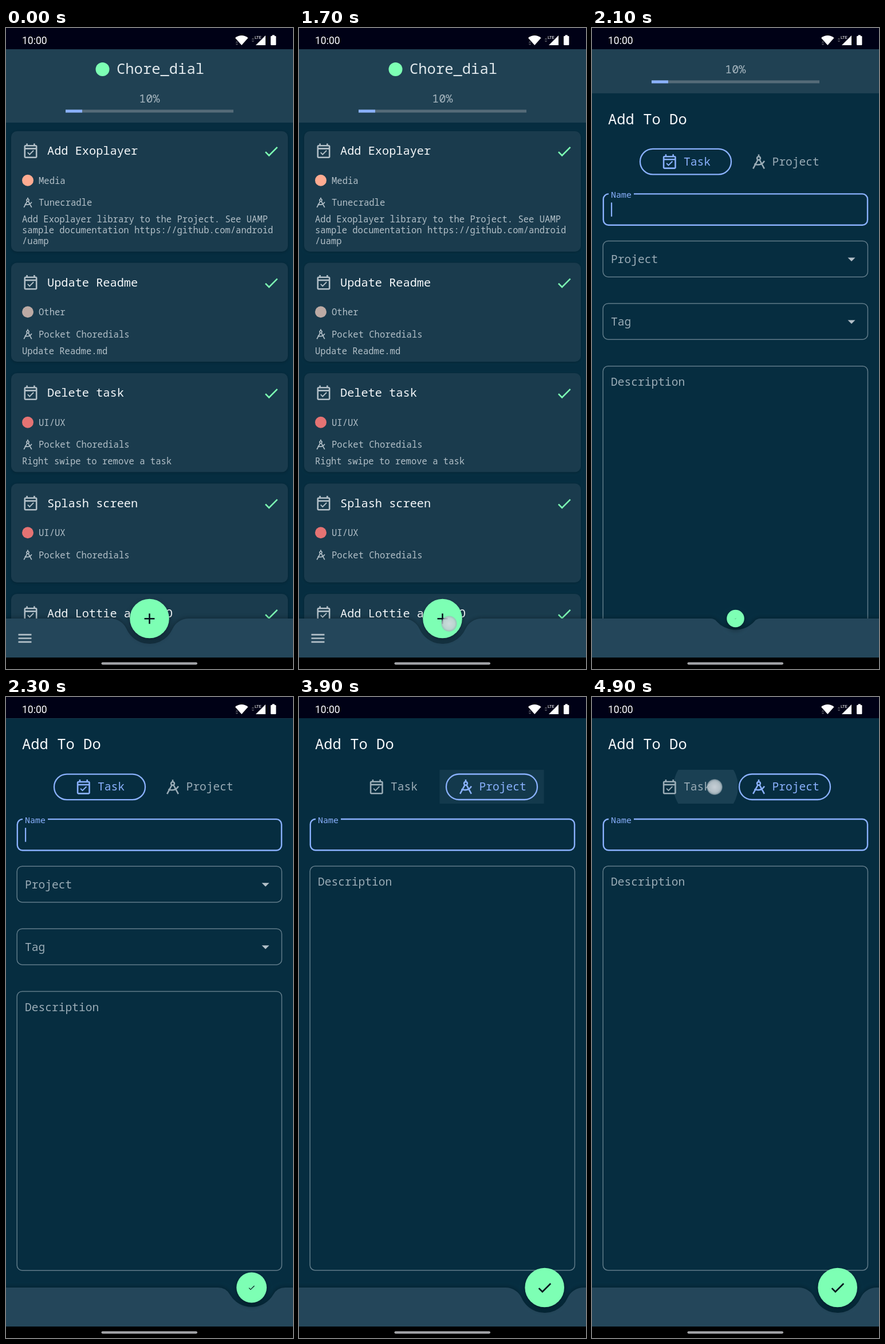
These frames come from a looping animation (501x1118 px, 5 s). An HTML page with a canvas:

```html
<!DOCTYPE html>
<html lang="en">
<head>
<meta charset="utf-8">
<title>To-do app</title>
<style>
html, body { margin: 0; width: 100%; height: 100%; overflow: hidden; background: #000; }
canvas { display: block; }
</style>
</head>
<body>
<canvas id="stage" width="501" height="1118"></canvas>
<script>
const ctx = document.getElementById('stage').getContext('2d');
const LOOP = 5000, W = 501, DP = 1.276, BAR_Y = 1030;
const MONO = '"Noto Sans Mono", "DejaVu Sans Mono", monospace';
const BG = '#062d40', HEADER = '#204153', CARD = '#1a3b4d', BAR = '#24465a', STATUS = '#000116';
const GREEN = '#7dffb4', BLUE = '#8ab1fd', WHITE = '#f5f8fa', SOFT = '#b3c0c8', HINT = '#9aacb6', LINE = '#607b89';

// Icons on a 24-unit grid
const EVENT = new Path2D('M16.53 11.06 15.47 10l-4.88 4.88-2.12-2.12-1.06 1.06L10.59 17zM19 3h-1V1h-2v2H8V1H6v2H5C3.9 3 3 3.9 3 5v14c0 1.1.9 2 2 2h14c1.1 0 2-.9 2-2V5c0-1.1-.9-2-2-2zm0 16H5V9h14zM5 7V5h14v2z');
const CHECK = new Path2D('M9 16.17 4.83 12l-1.42 1.41L9 19 21 7l-1.41-1.41z');
const PLUS = new Path2D('M19 13h-6v6h-2v-6H5v-2h6V5h2v6h6z');
const MENU = new Path2D('M3 18h18v-2H3zm0-5h18v-2H3zm0-7v2h18V6z');
const COMPASS = new Path2D('M12 2v3M14.3 7.3a2.3 2.3 0 1 1-4.6 0a2.3 2.3 0 1 1 4.6 0M10.8 9.5 4.3 21.5M13.2 9.5 19.7 21.5M6 15.2Q15.5 18.5 19.8 11');

const CARDS = [
  [180, 210, 'Add Exoplayer', 'Media', '#ffab91', 'Tunecradle',
    ['Add Exoplayer library to the Project. See UAMP', 'sample documentation https://github.com/android', '/uamp']],
  [409.5, 172.5, 'Update Readme', 'Other', '#bcaaa4', 'Pocket Choredials', ['Update Readme.md']],
  [602, 172.5, 'Delete task', 'UI/UX', '#e57373', 'Pocket Choredials', ['Right swipe to remove a task']],
  [794.5, 172.5, 'Splash screen', 'UI/UX', '#e57373', 'Pocket Choredials', []],
  [987, 172.5, 'Add Lottie at TODO', 'UI/UX', '#e57373', 'Pocket Choredials', []]
];

const ramp = (t, a, b) => Math.min(1, Math.max(0, (t - a) / (b - a)));
const easeOut = p => 1 - (1 - p) ** 2;

function text(s, x, y, size, color, font = MONO) {
  ctx.font = `${size}px ${font}`;
  ctx.fillStyle = color;
  ctx.fillText(s, x, y);
}
function rect(x, y, w, h, color) {
  ctx.fillStyle = color;
  ctx.fillRect(x, y, w, h);
}
function round(x, y, w, h, r) {
  ctx.beginPath();
  ctx.roundRect(x, y, w, h, r);
}
function disc(x, y, r, color) {
  ctx.beginPath();
  ctx.arc(x, y, r, 0, 7);
  ctx.fillStyle = color;
  ctx.fill();
}
function outline(color, width) {
  ctx.strokeStyle = color;
  ctx.lineWidth = width;
  ctx.stroke();
}
function poly(points, color) {
  ctx.beginPath();
  points.forEach(p => ctx.lineTo(...p));
  ctx.fillStyle = color;
  ctx.fill();
}
function icon(path, x, y, color, scale = DP) {
  ctx.save();
  ctx.translate(x, y);
  ctx.scale(scale, scale);
  ctx.translate(-12, -12);
  ctx.fillStyle = ctx.strokeStyle = color;
  ctx.lineWidth = 2;
  if (path === COMPASS) ctx.stroke(path);
  else ctx.fill(path, path === EVENT ? 'evenodd' : 'nonzero');
  ctx.restore();
}
function shadow(blur, dy, alpha) {
  ctx.shadowColor = `rgba(0,10,16,${alpha})`;
  ctx.shadowBlur = blur;
  ctx.shadowOffsetY = dy;
}

function drawCard([y, h, title, tag, color, project, lines]) {
  ctx.save();
  shadow(4, 1, 0.25);
  round(9, y, 483, h, 10);
  ctx.fillStyle = CARD;
  ctx.fill();
  ctx.restore();
  icon(EVENT, 43, y + 35.5, SOFT);
  text(title, 72, y + 41, 20.3, WHITE);
  icon(CHECK, 463, y + 35.2, GREEN);
  disc(38, y + 85.7, 10, color);
  text(tag, 57, y + 91.5, 15.55, SOFT);
  icon(COMPASS, 38, y + 124.5, SOFT, 0.88);
  text(project, 57, y + 130.3, 15.55, SOFT);
  lines.forEach((s, i) => text(s, 28, y + 159.3 + i * 18.6, 15.55, SOFT));
}

function drawHeader() {
  rect(0, 37, W, 128, HEADER);
  disc(168.5, 72, 12, GREEN);
  text('Chore_dial', 193, 80.3, 25.5, '#e0e8ec');
  text('10%', 232, 130.3, 20.3, '#a5b5be');
  rect(104, 142.5, 293, 5, '#556b78');
  rect(104, 142.5, 29, 5, BLUE);
}

function drawChip(x, path, label, selected) {
  const color = selected ? BLUE : HINT;
  if (selected) {
    round(x, 134.5, 159, 44.5, 22.2);
    outline(BLUE, 2.3);
  }
  icon(path, label === 'Task' ? 135.3 : 291, path === EVENT ? 158 : 156.8, color);
  text(label, label === 'Task' ? 160 : 314.5, 163.3, 19.6, color);
}

function drawRipple(fromX, toX, p, alpha) {
  if (p <= 0 || alpha <= 0) return;
  ctx.save();
  ctx.beginPath();
  ctx.rect(toX - 91, 127, 182, 59);
  ctx.clip();
  disc(fromX + (toX - fromX) * p, 156.5, 24 + 107 * p, `rgba(160,190,205,${0.13 * alpha})`);
  ctx.restore();
}

function drawField(label, y, h, arrow) {
  round(19.2, y, 462.2, h, 9);
  outline(LINE, 1.5);
  text(label, 33, y + (arrow ? 38.6 : 34.4), 19.6, HINT);
  if (arrow) poly([[446.5, y + 29], [459.5, y + 29], [453, y + 35.5]], SOFT);
}

function drawForm(t) {
  const project = t >= 3780;
  text('Add To Do', 28, 91.3, 25.5, WHITE);
  drawRipple(355, 336.5, ramp(t, 3550, 3800), 1 - ramp(t, 3780, 4100));
  drawRipple(214, 163.5, ramp(t, 4800, 5133), 1);
  drawChip(84, EVENT, 'Task', !project);
  drawChip(257, COMPASS, 'Project', project);

  round(19.8, 213, 461.2, 54.3, 9);
  outline(BLUE, 2.4);
  rect(29, 210, 44, 6, BG);
  text('Name', 33, 219.5, 15, BLUE);
  if (Math.floor((t - 2000) / 500) % 2 === 0) rect(33, 228, 2.2, 24.5, BLUE);

  if (!project) {
    drawField('Project', 295, 62.8, true);
    drawField('Tag', 404, 62.8, true);
  }
  const top = project ? 295 : 513.3;
  drawField('Description', top, 1000 - top, false);
}

// Bottom bar whose cradle flattens as the button scales down
function drawBar(cx, k) {
  const R = 44, a = 30.6 * k, v = R * (1 - k);
  ctx.save();
  shadow(9, 0, 0.45);
  ctx.beginPath();
  ctx.moveTo(-20, BAR_Y);
  if (k > 0.01) {
    const dx = Math.sqrt((R + a) ** 2 - (v + a) ** 2);
    const th = Math.atan2(-(v + a), dx);
    ctx.arc(cx - dx, BAR_Y + a, a, -Math.PI / 2, th);
    ctx.arc(cx, BAR_Y - v, R, Math.PI + th, -th, true);
    ctx.arc(cx + dx, BAR_Y + a, a, -Math.PI - th, -Math.PI / 2);
  }
  ctx.lineTo(W + 40, BAR_Y);
  ctx.lineTo(W + 40, 1098);
  ctx.lineTo(-20, 1098);
  ctx.fillStyle = BAR;
  ctx.fill();
  ctx.restore();
}

function drawButton(cx, k, path) {
  if (k <= 0.01) return;
  ctx.save();
  shadow(10, 5, 0.45);
  disc(cx, BAR_Y, 34.3 * k, GREEN);
  ctx.restore();
  icon(path, cx, BAR_Y + 0.3, '#04141c', DP * k ** 3);
}

function drawPointer(x, y, t, start, end) {
  const alpha = ramp(t, start, start + 40) * (1 - ramp(t, end, end + 170));
  if (!alpha) return;
  const g = ctx.createRadialGradient(x, y, 0, x, y, 14);
  g.addColorStop(0, 'rgba(212,218,224,.93)');
  g.addColorStop(0.7, 'rgba(196,206,212,.88)');
  g.addColorStop(0.9, 'rgba(170,184,192,.8)');
  g.addColorStop(1, 'rgba(150,168,178,.2)');
  ctx.globalAlpha = alpha;
  disc(x, y, 14, g);
  ctx.globalAlpha = 1;
}

function drawSystemBars() {
  rect(0, 0, W, 37, STATUS);
  text('10:00', 28, 28, 17.5, '#fff', 'Roboto, sans-serif');
  ctx.beginPath();
  ctx.moveTo(411.3, 30);
  ctx.lineTo(400, 17.2);
  ctx.quadraticCurveTo(411.3, 8.8, 422.6, 17.2);
  ctx.fillStyle = '#fff';
  ctx.fill();
  poly([[453, 13], [453, 30], [436, 30]], '#fff');
  rect(433, 11, 13.5, 9, STATUS);
  text('LTE', 434, 19.2, 7.6, '#fff', 'bold Roboto, sans-serif'.replace('bold ', ''));
  for (const [x, y] of [[403, 26.5], [431, 21]]) {
    poly([[x - 2.5, y - 1], [x + 2.5, y - 1], [x, y - 3.5]], '#55565f');
    poly([[x - 2.5, y + 1], [x + 2.5, y + 1], [x, y + 3.5]], '#55565f');
  }
  round(462, 14, 9.4, 16, 1.2);
  ctx.fillStyle = '#fff';
  ctx.fill();
  rect(464.6, 12.3, 4.2, 3, '#fff');
  rect(0, 1098, W, 20, '#000');
  round(166.5, 1106.2, 167.5, 4.2, 2.1);
  ctx.fillStyle = '#a3a4a8';
  ctx.fill();
}

function draw(t) {
  const lift = 127.5 * easeOut(ramp(t, 2040, 2310));
  const listAlpha = 1 - ramp(t, 1810, 1890);
  const formAlpha = ramp(t, 1880, 1990);
  const moved = t >= 2160;
  const k = moved ? easeOut(ramp(t, 2210, 2385)) : 1 - ramp(t, 2040, 2150);
  const cx = moved ? 428.7 : 250.5;

  rect(0, 0, W, 1118, BG);
  if (listAlpha) {
    ctx.globalAlpha = listAlpha;
    CARDS.forEach(drawCard);
  }
  if (formAlpha) {
    ctx.save();
    ctx.globalAlpha = formAlpha;
    ctx.translate(0, 127.5 - lift);
    drawForm(t);
    ctx.restore();
  }
  ctx.globalAlpha = 1;
  if (lift < 127.5) {
    ctx.save();
    ctx.translate(0, -lift);
    drawHeader();
    ctx.restore();
  }
  drawBar(cx, k);
  if (listAlpha) {
    ctx.globalAlpha = listAlpha;
    icon(MENU, 33, 1064.5, SOFT);
    ctx.globalAlpha = 1;
  }
  drawButton(cx, k, t < 1900 ? PLUS : CHECK);
  drawPointer(262, 1039, t, 1650, 1850);
  drawPointer(355, 157, t, 3500, 3700);
  drawPointer(214, 157, t, 4750, 5000);
  drawSystemBars();
}

function tick(now) {
  draw(now % LOOP);
  requestAnimationFrame(tick);
}
draw(0);
requestAnimationFrame(tick);
</script>
</body>
</html>
```
